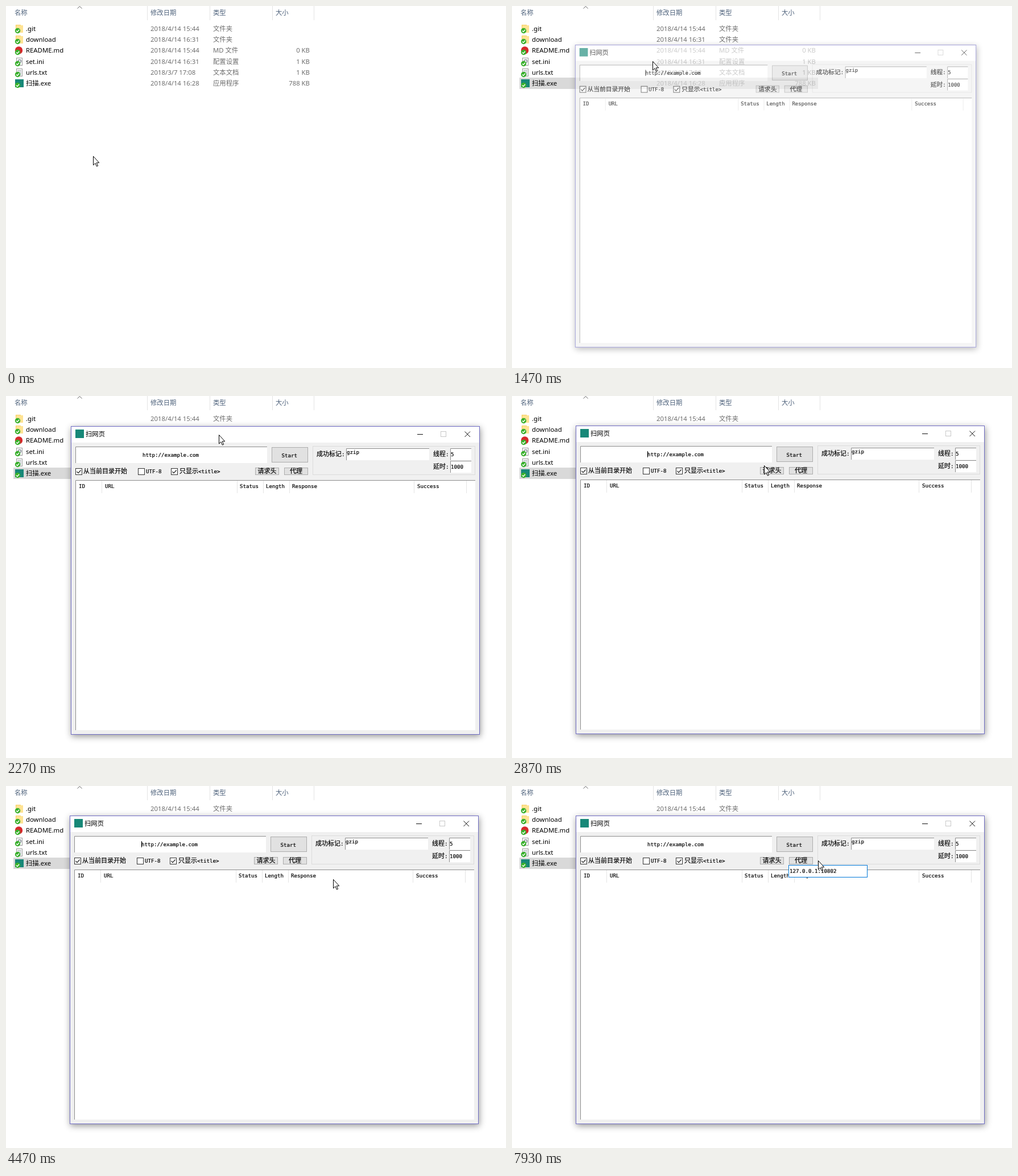
Animation, 879 px wide and 637 px high, one loop 8000 ms. Source, as an HTML page:

```html
<!DOCTYPE html>
<html lang="zh">
<head>
<meta charset="utf-8">
<style>
html, body { margin: 0; width: 100%; height: 100%; overflow: hidden; background: #fff; }
svg { display: block; width: 879px; height: 637px; }
text { white-space: pre; }
.ui { font: 11.35px "Noto Sans", "Noto Sans CJK SC", "Noto Sans CJK", sans-serif; }
.mono { font: 9.14px "DejaVu Sans Mono", monospace; stroke: #000; stroke-width: .2px; }
.mono tspan { font: 11px "Noto Sans CJK SC", "Noto Sans CJK", sans-serif; }
#frame { filter: drop-shadow(1px 3px 6px rgba(0, 0, 0, .42)); }
</style>
</head>
<body>
<svg id="stage" viewBox="0 0 879 637"></svg>
<script>
const LOOP = 8000, STEP = 1000 / 15;

const esc = s => s.replace(/</g, '&lt;');
const ui = (x, y, s, fill = '#000', anchor = 'start') =>
  `<text class="ui" x="${x}" y="${y + 4}" fill="${fill}" text-anchor="${anchor}">${esc(s)}</text>`;
const mono = (x, y, s, id = '') =>
  `<text class="mono" x="${x}" y="${y + 3.3}" ${id && `id="${id}"`}>` +
  esc(s).replace(/[\u4e00-\u9fff]+/g, '<tspan>$&</tspan>') + '</text>';
const rect = (x, y, w, h, fill, more = '') =>
  `<rect x="${x}" y="${y}" width="${w}" height="${h}" fill="${fill}" ${more}/>`;
const box = (x, y, w, h, fill, stroke) => rect(x + .5, y + .5, w - 1, h - 1, fill, `stroke="${stroke}"`);
const line = (d, stroke, more = '') => `<path d="${d}" fill="none" stroke="${stroke}" ${more}/>`;
const field = (x, y, w, h) => rect(x, y, w, h, '#fff') +
  line(`M${x + .5} ${y + h}V${y + .5}H${x + w}`, '#8c8c8c');
const button = (x, y, w, h) => box(x, y, w, h, '#e1e1e1', '#adadad');
const caret = (id, x, y) => rect(x, y, 1, 11, '#000', `id="${id}"`);
const check = (x, on) => box(x, 74, 12, 12, '#fff', '#333') +
  (on ? line(`M${x + 2.5} 80l2.5 2.7l4.5-5.2`, '#222', 'stroke-width="1.2"') : '');

// File list
const badge = y => `<circle cx="20.5" cy="${y + 3.5}" r="4.7" fill="#39b02c"/>` +
  line(`M18 ${y + 3.6}l1.9 1.9l3.2-3.7`, '#fff', 'stroke-width="1.4"');
const folder = y => rect(17, y - 7, 9, 13, '#f5cf62') + rect(18, y - 6, 12, 13, '#ffe394');
const page = y => box(18, y - 7, 11, 14, '#fff', '#9a9a9a');
const icons = {
  folder,
  disc: y => `<circle cx="22.5" cy="${y}" r="6.7" fill="#d8282c"/>`,
  gear: y => page(y) + `<circle cx="24" cy="${y - 1}" r="2.5" fill="none" stroke="#8d979f" stroke-width="1.6"/>`,
  lines: y => page(y) + line(`M20 ${y - 3.5}h7m-7 2.5h7m-7 2.5h7m-7 2.5h7`, '#9aa5ad'),
  app: y => rect(16, y - 7, 15, 14, '#178878')
};
const files = [
  ['folder', '.git', '2018/4/14 15:44', '文件夹', ''],
  ['folder', 'download', '2018/4/14 16:31', '文件夹', ''],
  ['disc', 'README.md', '2018/4/14 15:44', 'MD 文件', '0 KB'],
  ['gear', 'set.ini', '2018/4/14 16:31', '配置设置', '1 KB'],
  ['lines', 'urls.txt', '2018/3/7 17:08', '文本文档', '1 KB'],
  ['app', '扫描.exe', '2018/4/14 16:28', '应用程序', '788 KB']
];
const explorer = () => [[15, '名称'], [254, '修改日期'], [364, '类型'], [474, '大小']]
  .map(([x, s]) => ui(x, 12, s, '#4c607a')).join('') +
  line('M248.5 0V25M358.5 0V25M468.5 0V25M541.5 0V25', '#e3e3e3') +
  line('M125.5 4.5L129.5 .5L133.5 4.5', '#666') +
  rect(13, 126, 525, 20, 'none', 'id="row"') +
  files.map(([icon, name, date, type, size], i) => {
    const y = Math.round(40 + 19.2 * i), grey = '#6d6d6d';
    return icons[icon](y) + badge(y) + ui(35, y, name) + ui(254, y, date, grey) +
      ui(364, y, type, grey) + ui(534, y, size, grey, 'end');
  }).join('');

// Scanner window, in its own coordinates
const app = () => `<g id="frame">${rect(0, 0, 719, 543, '#f0f0f0')}</g>` +
  rect(1, 1, 717, 28, '#fff') + box(0, 0, 719, 543, 'none', '#6f6cc4') +
  rect(8, 6, 15, 15, '#178878') + ui(26, 14, '扫网页') +
  line('M609 14.5h10M692.5 9.5l9.5 9.5m0-9.5l-9.5 9.5', '#111') + box(650, 9, 10, 10, 'none', '#c8c8c8') +
  field(8, 36, 337, 29) + mono(126, 51, 'http://example.com') + caret('urlCaret', 126, 45) +
  button(353, 37, 64, 27) + mono(370.5, 52, 'Start') +
  box(425, 35, 286, 51, 'none', '#dcdcdc') +
  mono(432, 50, '成功标记:') + field(484, 39, 146, 21) + mono(485, 46, 'gzip') +
  mono(637, 50, '线程:') + field(667, 39, 37, 21) + mono(668, 50, '5') +
  mono(637, 72, '延时:') + field(667, 61, 37, 21) + mono(668, 72, '1000') +
  check(8, true) + mono(22, 80, '从当前目录开始') +
  check(118, false) + mono(132, 80, 'UTF-8') +
  check(176, true) + mono(191, 80, '只显示<title>') +
  button(324, 73, 42, 13) + mono(328.5, 80, '请求头') +
  button(375, 73, 42, 13) + mono(385, 80, '代理') +
  field(8, 95, 703, 440) +
  [[14, 'ID'], [60, 'URL'], [297, 'Status'], [343, 'Length'], [389, 'Response'], [609, 'Success']]
    .map(([x, s]) => mono(x, 106, s)).join('') +
  [54, 292, 338, 384, 603, 695].map(x => line(`M${x + .5} 96V118`, '#e4e4e4')).join('') +
  `<g id="headers">${box(8, 94, 703, 220, '#fff', '#0078d7')}${rect(694, 95, 16, 218, '#f0f0f0')}` +
  line('M698.5 106l3.5-3.5l3.5 3.5M698.5 303l3.5 3.5l3.5-3.5', '#a3a3a3', 'stroke-width="1.4"') +
  mono(9, 102, 'User-Agent: Mozilla/5.0 (Windows NT 10.0; Win64; x64) AppleWebKit/537.36 (KHTML, like Gecko) Chrome/65.0.3325.181') +
  mono(9, 113, 'Safari/537.36') + mono(9, 124, 'Cookie: test=test') + caret('cookieCaret', 103, 118) +
  button(653, 313, 57, 28) + ui(681.5, 328, '保存', '#000', 'middle') + '</g>' +
  `<g id="proxy">${box(374, 87, 139, 22, '#fff', '#0078d7')}${mono(376, 98, '', 'address')}` +
  caret('proxyCaret', 376, 93) + '</g>';

document.getElementById('stage').innerHTML = explorer() + `<g id="app">${app()}</g>` +
  '<g id="cursor"><path id="arrow" d="M.5 .5V16L4 12.7L6.4 18.2L8.6 17.2L6.2 11.8H10.8Z" fill="#fff" stroke="#000"/>' +
  '<path id="beam" d="M-3.5-7.5H-1L0-6.5L1-7.5H3.5M0-6.5V6.5M-3.5 7.5H-1L0 6.5L1 7.5H3.5" fill="none" stroke="#000" stroke-width="1.2"/></g>';

// Keys: time, then values
const mouse = [
  [0, 153, 264], [267, 205, 461], [733, 95, 134], [1000, 95, 134], [1467, 247, 97], [1867, 366, 83],
  [1933, 368, 79], [2000, 368, 79], [2133, 377, 63], [2267, 374, 68], [2333, 372, 68], [2467, 372, 68],
  [2933, 455, 131], [3000, 455, 131], [3267, 620, 285], [3333, 620, 285], [3733, 756, 360],
  [3933, 783, 382], [4000, 783, 382], [4200, 705, 225], [4600, 510, 133], [4733, 510, 133],
  [5067, 532, 165], [5267, 532, 152], [5533, 532, 152], [5733, 560, 148], [7733, 560, 148], [7933, 538, 131]
];
const place = [[2000, 104, 63], [2133, 113, 48], [2267, 114, 53], [2333, 112, 52]];
const opening = [[1400, .3, .95], [1467, .65, .981], [1533, .9, .995], [1600, 1, 1]];
const typing = [6467, 6733, 6867, 6933, 7067, 7200];

function at(keys, t) {
  const i = keys.findIndex(k => k[0] > t);
  if (i < 0) return keys[keys.length - 1].slice(1);
  if (!i) return keys[0].slice(1);
  const a = keys[i - 1], b = keys[i], f = (t - a[0]) / (b[0] - a[0]);
  return a.slice(1).map((v, n) => v + (b[n + 1] - v) * f);
}

const el = id => document.getElementById(id);
const set = (id, name, value) => el(id).setAttribute(name, value);
const show = (id, on) => set(id, 'display', on ? 'inline' : 'none');
const within = (t, ...spans) => spans.some(([a, b]) => t >= a && t < b);
const inside = (x, y, l, t, r, b) => x >= l && x < r && y >= t && y < b;

function draw(now) {
  const t = Math.floor((now % LOOP + 4) / STEP) * STEP + .5;
  const [mx, my] = at(mouse, t).map(Math.round);
  const [wx, wy] = at(place, t).map(Math.round);
  const [alpha, scale] = at(opening, t);
  const headers = within(t, [3000, 4000]), proxy = t >= 4733;

  const hover = inside(mx, my, 13, 126, 538, 146);
  set('row', 'fill', t >= 1400 ? '#d9d9d9' : t >= 733 ? '#cce8ff' : hover ? '#e5f3ff' : 'none');

  show('app', t >= 1400);
  set('app', 'opacity', alpha);
  set('app', 'transform', `translate(${wx + 359.5 * (1 - scale)} ${wy + 271 * (1 - scale)}) scale(${scale})`);
  show('headers', headers);
  show('proxy', proxy);
  show('urlCaret', within(t, [1400, 2066], [2600, 3000], [4000, 4533]));
  show('cookieCaret', t >= 3400);

  const typed = typing.filter(k => t >= k).length;
  el('address').textContent = '127.0.0.1' + ':10802'.slice(0, typed);
  set('proxyCaret', 'x', t < 5667 ? 376 : 426 + 5.5 * typed);
  show('proxyCaret', within(t, [4733, 6133], [6467, 7733]));

  const beam = headers && inside(mx, my, 120, 147, 806, 366) ||
    proxy && inside(mx, my, 486, 139, 625, 168) ||
    t > 2467 && inside(mx, my, 120, 88, 457, 117);
  show('beam', beam);
  show('arrow', !beam);
  show('cursor', !within(t, [6533, 7733]));
  set('cursor', 'transform', `translate(${mx} ${my})`);
}

const start = performance.now();
function tick() {
  draw(performance.now() - start);
  requestAnimationFrame(tick);
}
tick();
</script>
</body>
</html>
```
